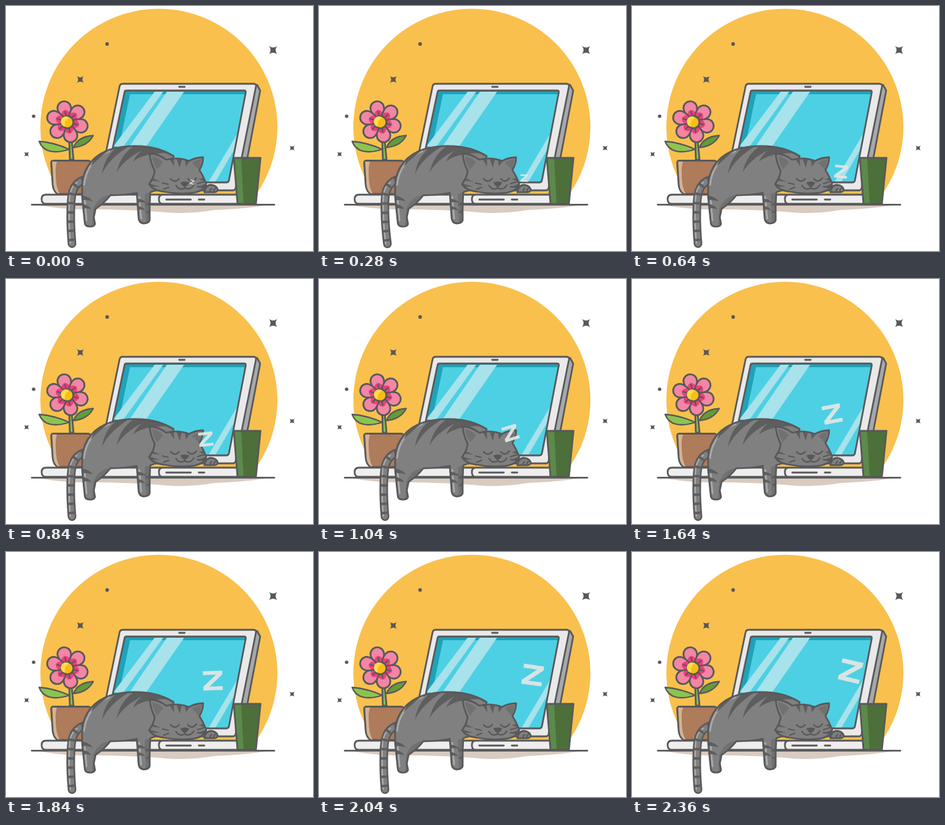
Animation, 500 px wide and 400 px high, one loop 2.4 s. Source, as an HTML page:

```html
<!DOCTYPE html>
<html lang="en">
<head>
<meta charset="utf-8">
<title>Sleeping cat</title>
<style>
  html, body { margin: 0; width: 100%; height: 100%; overflow: hidden; background: #fff; }
  svg { display: block; width: 500px; height: 400px; }
  .line { stroke: #58585a; stroke-width: 2.8; stroke-linejoin: round; stroke-linecap: round; }
  .thin { stroke-width: 2.3; }
  .open { fill: none; }
  .ink { fill: #58585a; }
  .fur { fill: #808080; }
  .stripe { fill: #5e5e5f; }
  .shade { fill: #717172; }
  .shine { fill: none; stroke: #a9a9aa; stroke-width: 3; stroke-linecap: round; }
  .paper { fill: #eeeeee; }
</style>
</head>
<body>
<svg viewBox="0 0 500 400">
  <defs>
    <path id="star" d="M-1-1Q0-.3 1-1Q.3 0 1 1Q0 .3-1 1Q-.3 0-1-1Z"/>
    <g id="petal">
      <path class="line" fill="#f286a4" d="M0 0C-4-7-11-14-11-23A11 11 0 0 1 11-23C11-14 4-7 0 0Z"/>
      <path fill="#ec3f7c" d="M0 0L-7-14L-4-18L0-20L4-18L7-14Z"/>
      <path class="line thin" d="M0-8V-17"/>
    </g>
    <path id="body" d="M124 291C126 262 145 242 170 234C200 226 241 225 273 245L262 295L235 304L234 325L234 350Q232 355 224 355Q217 354 216 347L213 305Q193 309 170 309Q160 322 146 331L143 345L145 356Q143 361 135 360Q128 360 128 351L124 312Z"/>
    <path id="head" d="M234 241Q248 241 261 251Q280 246 298 253Q309 247 321 247Q321 258 315 268Q321 277 326 290Q325 301 305 305Q281 308 256 303Q239 301 233 291L239 281Q242 273 242 269Q235 255 234 241Z"/>
    <path id="tailLine" d="M129 283C105 290 106 314 105.500 335C105 355 106 371 107.500 388"/>
    <clipPath id="inBody"><use href="#body"/></clipPath>
    <clipPath id="inHead"><use href="#head"/></clipPath>
    <clipPath id="aboveTable"><path d="M0 0H500V324H0Z"/></clipPath>
  </defs>

  <circle cx="249" cy="197.5" r="193" fill="#f9c04d" clip-path="url(#aboveTable)"/>
  <g class="ink">
    <use href="#star" transform="translate(435 72) scale(6.4)"/>
    <use href="#star" transform="translate(121 120) scale(5.4)"/>
    <use href="#star" transform="translate(466 232) scale(4)"/>
    <use href="#star" transform="translate(33.500 242) scale(3.8)"/>
    <circle cx="164.700" cy="62" r="2.900"/>
    <circle cx="45" cy="180" r="2.800"/>
  </g>
  <path fill="#d9cbc0" d="M54 325Q90 333 150 332Q220 333 260 337Q300 340 340 333Q390 331 426 325Z"/>

  <!-- laptop -->
  <path class="line" fill="#a6a8aa" d="M403 127L409 129L414 138L388 275L371 301Z"/>
  <path class="line" fill="#e9e9ea" d="M190 127H403Q408 127 407 132L374 297Q373 301 369 301H150L185 131Q186 127 190 127Z"/>
  <path fill="#4dd0e4" d="M193 138H391L362 288H162Z"/>
  <path fill="#20a2b8" d="M193 138H391L390 144H202L183 235H173Z"/>
  <path fill="#a8e2ea" d="M242 140H256L190 231L175 229ZM262 140H290L227 231H200ZM377 208L372 234L341 287H330Z"/>
  <path class="line open" d="M196 138H388Q391 138 390.500 141L363 285Q362 288 359 288H162L193 141Q193.500 138 196 138Z"/>
  <path class="line open" d="M282 132H291"/>

  <!-- flower in its pot -->
  <path class="line" fill="#ae7b5b" d="M77 252.500H134Q138 252.500 137.500 257L135 267V307H84Q77 302 76 292L73.500 257Q73 252.500 77 252.500Z"/>
  <path fill="#d3b395" d="M75.500 254H83Q80 262 81 275Q81 295 87 306H85Q78 302 77.500 291Z"/>
  <path class="line" fill="#8cc152" d="M103 220L104 251H110L107 220Z"/>
  <path class="line thin" fill="#8cc450" d="M54 221C60 238 78 242 103 234Q79 223 54 221Z"/>
  <path class="line thin" fill="#649b3a" d="M110 231Q117 213 142 211.500Q133 229 110 231Z"/>
  <g id="petals" transform="translate(100 189) rotate(-13)"></g>
  <circle class="line" cx="100" cy="189.800" r="9.800" fill="#f9bd19"/>
  <path fill="#ffdc4a" d="M103 182A8.500 8.500 0 1 0 96 197Q94 186 103 182Z"/>

  <!-- books and table -->
  <path class="line paper" d="M252 308H65Q58 308 58 315.500T65 323H252Z"/>
  <path class="line paper" d="M378 308H255Q249 308 249 315.500T255 323H378Z"/>
  <path class="line open" d="M261 316H301M314 316H323"/>
  <path class="line open" d="M42 324.400H437"/>
  <path fill="#4d6f3a" d="M371 248H414L407 323H377Z"/>
  <path fill="#5c8a4b" d="M372 249H383L387 322H378Z"/>
  <path class="line open" d="M371 248H414.500L407 323H377Z"/>

  <!-- cat -->
  <g id="tail" fill="none" stroke-linecap="round">
    <use href="#tailLine" stroke="#58585a" stroke-width="14"/>
    <use href="#tailLine" stroke="#808080" stroke-width="9"/>
    <path class="shine" style="stroke-width:2.500" d="M116 288C102 297 103 314 102.800 335C102.500 355 103 371 104.800 387"/>
    <use href="#tailLine" stroke="#5e5e5f" stroke-width="9" stroke-linecap="butt" stroke-dasharray="4 11" stroke-dashoffset="-17"/>
  </g>
  <use href="#body" class="fur"/>
  <g clip-path="url(#inBody)">
    <path class="shade" d="M170 309Q152 309 142 331L140 362H150V330ZM226 307L228 357H237V303Z"/>
    <path class="shine" d="M127 292C130 265 146 245 168 237M128 315L131 350M217 312L220 347"/>
    <path class="stripe" d="M184 229Q161 243 156 275Q167 249 202 228ZM213 226Q187 240 180 272Q194 246 238 228ZM159 235Q143 246 138 262Q150 249 171 233ZM240 226Q215 235 207 254Q224 239 270 240L274 246Z"/>
    <path class="stripe" d="M122 309Q136 311 141 319Q132 316 123 317ZM122 323Q135 324 139 332Q131 329 124 331ZM212 314Q224 315 229 322Q222 319 213 321ZM213 326Q224 328 227 334Q221 331 214 333ZM236 318L225 325L236 326ZM236 331L226 337L236 339Z"/>
  </g>
  <use href="#body" class="line open"/>
  <path class="line fur" d="M323 304Q325 292 334 292Q343 293 345 300Q344 304 339 304Z"/>
  <path class="line thin open" d="M333 303Q332 299 335 298M339 303Q338 299 341 298"/>

  <use href="#head" class="fur"/>
  <g clip-path="url(#inHead)">
    <path class="shade" d="M238 245Q249 247 256 255L246 267Q239 257 238 245ZM318 250Q309 251 303 256L315 268Z"/>
    <path class="stripe" d="M265 248L274 262L273 248ZM277 247L283 264L287 248ZM291 249L293 262L300 252ZM232 278L252 287L236 285ZM230 289L251 295L236 295ZM326 279L314 283L327 287ZM328 289L316 294L325 296Z"/>
  </g>
  <use href="#head" class="line open"/>
  <path class="line thin open" d="M268 282Q275 290 282 282M296 282Q303 290 310 281M277 293Q282 302 291 297Q300 302 306 292M291 292V297M255 289L264 291M257 299L265 296M312 290L322 287M312 295L323 296"/>
  <path class="ink" d="M284 288Q291 285 298.500 288Q295 295 291 295Q287 295 284 288Z"/>

  <path id="zed" fill="#e3e6e4" fill-opacity=".92" d="M-.5-.5H.5V-.3L-.18.3H.5V.5H-.5V.3L.18-.3H-.5Z"/>
</svg>
<script>
  const LOOP = 2400, WAG = 560;
  const byId = id => document.getElementById(id);
  const tail = byId('tail'), zed = byId('zed');

  byId('petals').innerHTML = Array.from({ length: 6 },
    (_, i) => `<use href="#petal" transform="rotate(${i * 60})"/>`).join('');

  // time, x, y, size, angle
  const keys = [
    [0, 303, 287.5, 7, 12],
    [280, 334, 281, 12, 2],
    [640, 340.5, 270.5, 21, 6],
    [1040, 312, 251.5, 24.5, -17],
    [1640, 326, 220.5, 30, -11],
    [2040, 348, 201, 33, 8],
    [2360, 356, 194.5, 35, 13],
    [2400, 356.8, 194, 35.3, 13.5]
  ];

  // Smooth curve through the keys with slopes taken from their neighbours
  function poseAt(t) {
    let i = 0;
    while (i < keys.length - 2 && t >= keys[i + 1][0]) i++;
    const a = keys[i], b = keys[i + 1], span = b[0] - a[0], u = (t - a[0]) / span;
    const slope = (k, c) => {
      const p = keys[Math.max(k - 1, 0)], n = keys[Math.min(k + 1, keys.length - 1)];
      return (n[c] - p[c]) / (n[0] - p[0]);
    };
    const curve = c => {
      const d = b[c] - a[c], m = slope(i, c) * span, n = slope(i + 1, c) * span;
      return a[c] + u * (m + u * (3 * d - 2 * m - n + u * (m + n - 2 * d)));
    };
    return [1, 2, 3, 4].map(curve);
  }

  function draw() {
    const t = performance.now() % LOOP;
    const [x, y, size, angle] = poseAt(t);
    const wag = t < WAG ? -2.2 * Math.sin(Math.PI * t / WAG) : 0;
    zed.setAttribute('transform', `translate(${x} ${y}) rotate(${angle}) scale(${size})`);
    tail.setAttribute('transform', `rotate(${wag} 120 286)`);
    requestAnimationFrame(draw);
  }
  draw();
</script>
</body>
</html>
```
